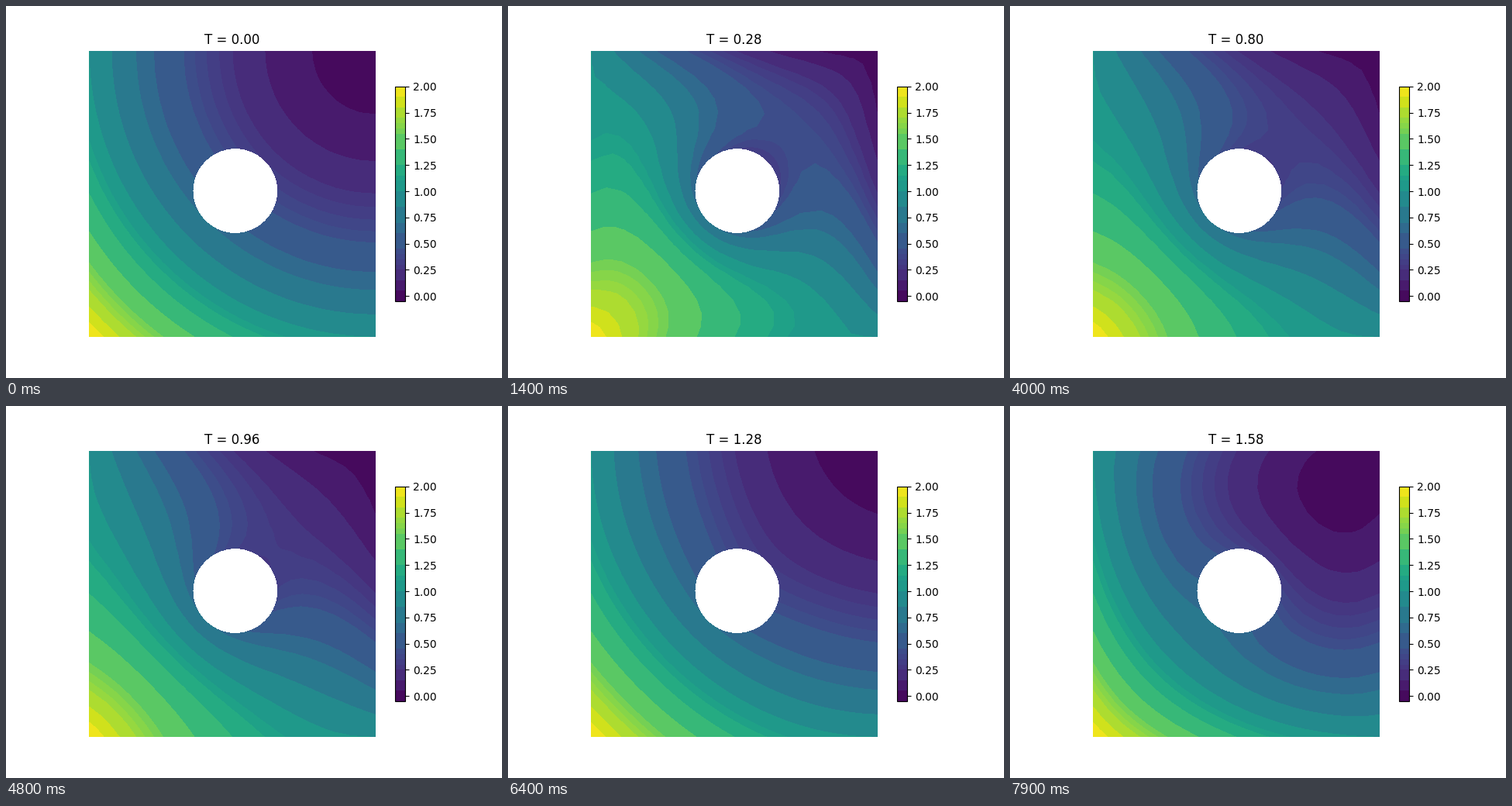
A matplotlib script that plays this animation: 640 by 480 pixels, repeating every 8 s.

```python
import numpy as np
import matplotlib.pyplot as plt
from matplotlib.animation import FuncAnimation
from matplotlib.tri import Triangulation

FRAMES, DT = 80, 0.02
CENTER, RADIUS = 0.5104, 0.1485
RINGS = ((RADIUS, 56), (0.168, 50), (0.198, 44), (0.236, 40))
H = 0.05
LEVELS = [-0.05, 0.05, 0.15, 0.25, 0.3, 0.35, 0.4, 0.45, 0.6, 0.7, 0.85, 1,
          1.1, 1.15, 1.25, 1.4, 1.55, 1.6, 1.65, 1.7, 1.8, 1.9, 2]


def ring(radius, n):
    a = 2 * np.pi * np.arange(n) / n
    return CENTER + radius * np.column_stack([np.cos(a), np.sin(a)])


def build_mesh():
    """Unit square with a round hole, finer near the hole."""
    rng = np.random.default_rng(4)
    s = np.linspace(0, 1, 21)[:-1]
    zero, one = np.zeros_like(s), np.ones_like(s)
    border = np.vstack([np.column_stack(c) for c in
                        ((s, zero), (one, s), (1 - s, one), (zero, 1 - s))])
    rows = np.linspace(0.042, 0.958, 22)
    grid = np.array([(x + (i % 2) * H / 2, y) for i, y in enumerate(rows)
                     for x in np.arange(0.03, 0.97, H)])
    grid += rng.uniform(-0.007, 0.007, grid.shape)
    far = np.hypot(*(grid - CENTER).T) > 0.27
    inside = np.all((grid > 0.025) & (grid < 0.975), axis=1)
    hole = ring(*RINGS[0])
    layers = [ring(*r) for r in RINGS[1:]]
    pts = np.vstack([border, hole, *layers, grid[far & inside]])
    n_border, n_fixed = len(border), len(border) + len(hole)

    tri = Triangulation(pts[:, 0], pts[:, 1])
    t = tri.triangles
    in_hole = np.all((t >= n_border) & (t < n_fixed), axis=1)
    return Triangulation(pts[:, 0], pts[:, 1], t[~in_hole]), pts, n_fixed


def assemble(pts, t):
    """Stiffness and mass matrices for linear elements."""
    p = pts[t]
    e = p[:, [2, 0, 1]] - p[:, [1, 2, 0]]
    area = np.abs(e[:, 0, 0] * e[:, 1, 1] - e[:, 0, 1] * e[:, 1, 0]) / 2
    area = np.maximum(area, 1e-9)[:, None, None]
    stiff = np.zeros((len(pts), len(pts)))
    mass = np.zeros_like(stiff)
    idx = (t[:, :, None], t[:, None, :])
    np.add.at(stiff, idx, np.einsum("nid,njd->nij", e, e) / (4 * area))
    np.add.at(mass, idx, area / 12 * (1 + np.eye(3)))
    return stiff, mass


def solve(pts, t, n_fixed):
    """Heat equation with an oscillating source and fixed edges."""
    start = np.sum((1 - pts) ** 2, axis=1)
    stiff, mass = assemble(pts, t)
    load = mass.sum(axis=1)[n_fixed:]
    stiff, mass = stiff[n_fixed:, n_fixed:], mass[n_fixed:, n_fixed:]
    step = np.linalg.inv(mass + DT * stiff)
    w = np.zeros(len(load))
    states = []
    for k in range(FRAMES):
        u = start.copy()
        u[n_fixed:] += w
        states.append(np.clip(u, -0.0499, 1.9999))
        source = 4 + 10 * np.cos(1.5 * DT * (k + 1))
        w = step @ (mass @ w + DT * source * load)
    return states


mesh, nodes, n_fixed = build_mesh()
states = solve(nodes, mesh.triangles, n_fixed)

fig, ax = plt.subplots(figsize=(6.4, 4.8), dpi=100)


def paint(k):
    for art in list(ax.collections):
        art.remove()
    ax.set_title(f"T = {k * DT:.2f}")
    return ax.tricontourf(mesh, states[k], levels=LEVELS, cmap="viridis",
                          vmin=-0.05, vmax=2)


bar = fig.colorbar(paint(0), ax=ax, shrink=0.75, spacing="proportional",
                   ticks=np.arange(0, 2.01, 0.25), format="%.2f")
bar.minorticks_off()
ax.set(xlim=(0, 1), ylim=(0, 1), aspect="equal")
ax.axis("off")


def update(k):
    paint(k)
    return ()


anim = FuncAnimation(fig, update, frames=FRAMES, init_func=lambda: (),
                     interval=100, repeat=True, repeat_delay=0, blit=False)
plt.show()
```
